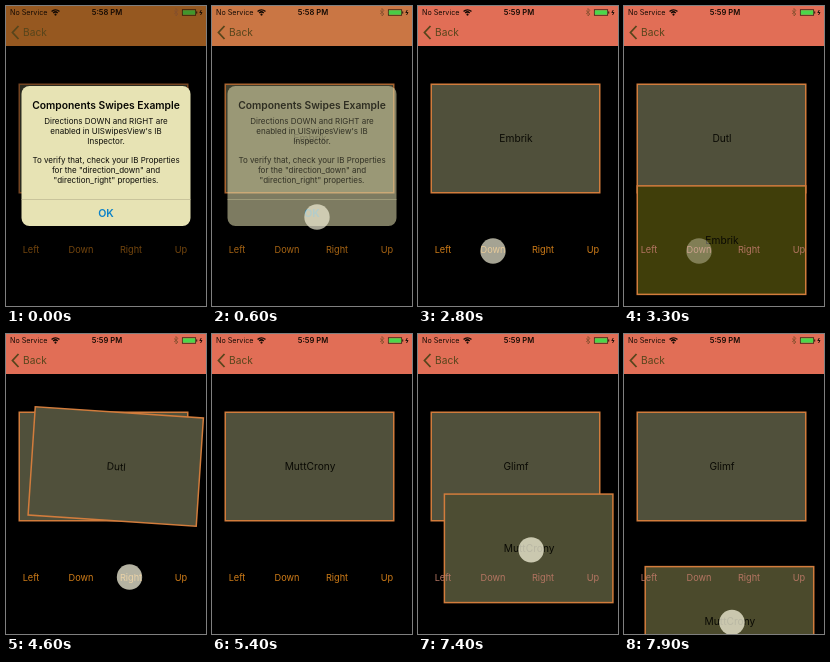
Write an HTML page with a canvas that moves like this. It is 200 px wide and 300 px high and loops after 8000 ms.

```html
<!DOCTYPE html>
<html lang="en">
<head>
<meta charset="utf-8">
<title>Swipe cards</title>
<style>
  html, body { margin: 0; width: 100%; height: 100%; overflow: hidden; background: #000; }
  canvas { display: block; width: 200px; height: 300px; }
</style>
</head>
<body>
<canvas id="stage" width="200" height="300"></canvas>
<script>
const ctx = document.getElementById('stage').getContext('2d');
const LOOP = 8000;
const BORDER = '#d27c3c';
const CARD_FILL = [80, 80, 59];
const OLIVE = [64, 62, 10];
const CARD = { x: 97.5, y: 132.5, w: 168.5, h: 108.5 };
const NAMES = ['Embrik', 'Dutl', 'MuttCrony', 'Glimf'];
const BUTTONS = ['Left', 'Down', 'Right', 'Up'];
const MESSAGE = [
  [115, 'Directions DOWN and RIGHT are'],
  [125, "enabled in UISwipesView's IB"],
  [135, 'Inspector.'],
  [154.5, 'To verify that, check your IB Properties'],
  [164.5, 'for the "direction_down" and'],
  [174.5, '"direction_right" properties.']
];
// Taps: position, then fade-in start, full, fade-out start, end
const TAPS = [
  [105, 211, 150, 400, 480, 850],
  [21.5, 253.5, 1550, 1700, 1900, 2400],
  [75, 245, 2700, 2850, 2950, 3500],
  [123.5, 243, 4300, 4420, 4460, 5000],
  [176, 244, 5950, 6050, 6120, 6600]
];
const DOWN_START = 3010, RIGHT_START = 4500, DRAG_START = 7100;

const progress = (t, a, b) => Math.min(1, Math.max(0, (t - a) / (b - a)));
const mix = (a, b, p) => a.map((v, i) => v + (b[i] - v) * p);
const rgb = c => `rgb(${c.map(Math.round)})`;
const accelerate = elapsed => 0.0012 * Math.max(0, elapsed) ** 2;

function text(str, x, y, size, color, weight = 400, align = 'center') {
  ctx.font = `${weight} ${size}px Inter, "Open Sans", sans-serif`;
  ctx.textAlign = align;
  ctx.fillStyle = color;
  ctx.fillText(str, x, y + size * 0.36);
}

function line(points, color, width) {
  ctx.beginPath();
  points.forEach(([x, y]) => ctx.lineTo(x, y));
  ctx.strokeStyle = color;
  ctx.lineWidth = width;
  ctx.stroke();
}

function card(name, dx = 0, dy = 0, angle = 0, fill = CARD_FILL) {
  const { x, y, w, h } = CARD;
  ctx.save();
  ctx.translate(x + dx, y + dy);
  ctx.rotate(angle * Math.PI / 180);
  ctx.fillStyle = rgb(fill);
  ctx.fillRect(-w / 2, -h / 2, w, h);
  ctx.strokeStyle = BORDER;
  ctx.lineWidth = 1.5;
  ctx.strokeRect(-w / 2, -h / 2, w, h);
  text(name, 0.5, 0, 10.2, '#0a0a04');
  ctx.restore();
}

function dragOffset(t) {
  const p = Math.sin(progress(t, DRAG_START, 7950) * Math.PI / 2);
  return [8 * p + 9 * Math.sin(Math.PI * p) ** 2, 155 * p];
}

function cards(t) {
  if (t < RIGHT_START - 500) {
    const dy = accelerate(t - DOWN_START);
    if (dy) card(NAMES[1]);
    card(NAMES[0], 0, dy, 0, mix(CARD_FILL, OLIVE, Math.min(1, dy / 100)));
    return dy;
  }
  if (t < 5400) {
    const dx = accelerate(t - RIGHT_START);
    if (dx) card(NAMES[2]);
    card(NAMES[1], dx, 0, 3.8 * progress(t, RIGHT_START, RIGHT_START + 100));
    return 0;
  }
  const [dx, dy] = dragOffset(t);
  if (dy) card(NAMES[3]);
  card(NAMES[2], dx, dy, 0, mix(CARD_FILL, OLIVE, dy / 500));
  return dy;
}

function header(t) {
  const dimmed = [150, 88, 32], half = [202, 118, 68], full = [225, 110, 86];
  ctx.fillStyle = rgb(t < 600
    ? mix(dimmed, half, progress(t, 150, 600))
    : mix(half, full, progress(t, 600, 1250)));
  ctx.fillRect(0, 0, 200, 40);

  const ink = '#140a04';
  text('No Service', 4, 6.5, 7.2, ink, 400, 'left');
  text(t < 1600 ? '5:58 PM' : '5:59 PM', 101, 6.5, 7.6, ink, 600);

  ctx.strokeStyle = ctx.fillStyle = ink;
  ctx.lineWidth = 1.3;
  for (const r of [3.2, 5.4]) {
    ctx.beginPath();
    ctx.arc(49.5, 9.2, r, -Math.PI * 0.76, -Math.PI * 0.24);
    ctx.stroke();
  }
  ctx.beginPath();
  ctx.arc(49.5, 8.6, 1.1, 0, 7);
  ctx.fill();

  line([[168, 4.5], [172, 8], [170, 10], [170, 2.5], [172, 4.5], [168, 8]], '#84502e', 0.8);
  ctx.strokeStyle = ink;
  ctx.lineWidth = 0.7;
  ctx.strokeRect(176.3, 3.8, 13.4, 5.4);
  ctx.fillStyle = rgb(mix([65, 150, 45], [75, 215, 75], progress(t, 150, 700)));
  ctx.fillRect(176.8, 4.3, 12.4, 4.4);
  ctx.fillStyle = ink;
  ctx.fillRect(190.3, 5.4, 0.9, 2.2);
  line([[195.3, 4], [193.8, 6.5], [196, 6.5], [194.5, 9]], ink, 0.9);

  const back = '#57451c';
  line([[12.5, 20], [6.5, 26.5], [12.5, 33]], back, 1.8);
  text('Back', 17, 26.5, 10.2, back, 400, 'left');
}

function alertBox(t) {
  const alpha = 1 - progress(t, 380, 860);
  if (!alpha) return;
  ctx.globalAlpha = alpha;
  ctx.fillStyle = '#e7e3b4';
  ctx.beginPath();
  ctx.roundRect(15.5, 80, 169, 140, 8);
  ctx.fill();
  // Ink outlasts the panel so the words stay legible while it fades
  ctx.globalAlpha = Math.sqrt(alpha);
  text('Components Swipes Example', 100, 99, 10.3, '#080804', 600);
  for (const [y, str] of MESSAGE) text(str, 100, y, 8, '#0c0c08');
  line([[15.5, 193.5], [184.5, 193.5]], '#bdb891', 0.7);
  text('OK', 100, 207, 10.6, '#0b82c8', 600);
  ctx.globalAlpha = 1;
}

function touch(x, y, alpha) {
  if (alpha <= 0) return;
  ctx.globalAlpha = alpha;
  ctx.fillStyle = '#f4f2da';
  ctx.beginPath();
  ctx.arc(x, y, 12.7, 0, 7);
  ctx.fill();
  ctx.globalAlpha = 1;
}

function draw(t) {
  ctx.fillStyle = '#000';
  ctx.fillRect(0, 0, 200, 300);
  const dy = cards(t);
  const covered = dy > 57 && dy < 222;
  BUTTONS.forEach((label, i) =>
    text(label, 25 + 50 * i, 244, 9.2, covered ? '#b47562' : '#cf7c18'));

  ctx.fillStyle = `rgba(0,0,0,${0.45 * (1 - progress(t, 150, 950))})`;
  ctx.fillRect(0, 40, 200, 260);
  header(t);
  alertBox(t);

  for (const [x, y, start, full, fade, end] of TAPS) {
    touch(x, y, Math.min(progress(t, start, full), 1 - progress(t, fade, end)));
  }
  const [dx, dragY] = dragOffset(t);
  touch(100 + dx, 134 + dragY, 0.75 * progress(t, 6850, 7050));
}

function frame(now) {
  draw(now % LOOP);
  requestAnimationFrame(frame);
}
requestAnimationFrame(frame);
</script>
</body>
</html>
```
